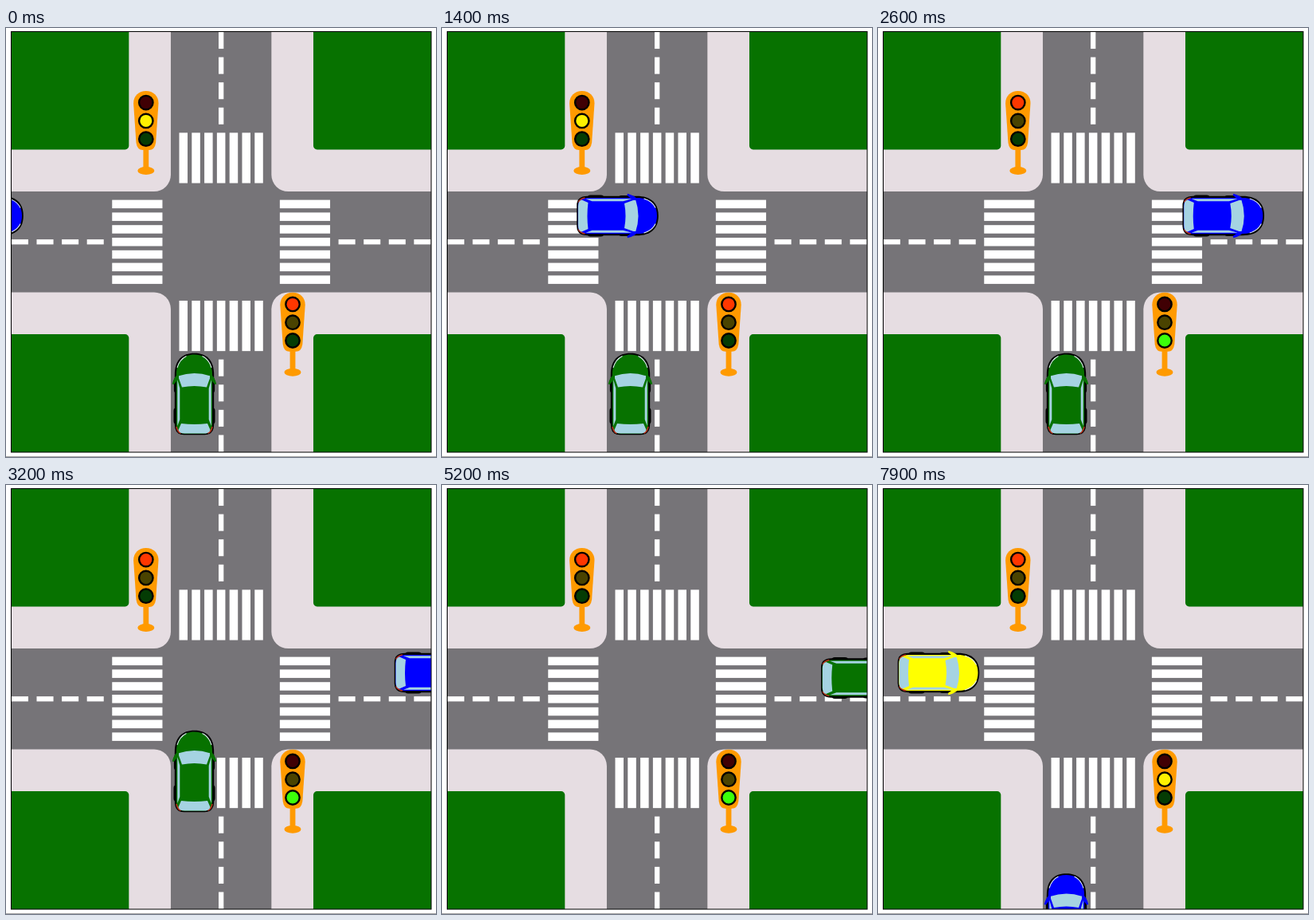
These frames come from a looping animation (540x538 px, 8 s). An HTML page:

```html
<!DOCTYPE html>
<html lang="en">
<head>
<meta charset="utf-8">
<title>Crossroads</title>
<style>
  html, body { margin: 0; width: 100%; height: 100%; overflow: hidden; background: #fff; }
  svg { display: block; }
</style>
</head>
<body>
<svg width="540" height="538" viewBox="0 0 540 538">
  <defs>
    <clipPath id="town"><rect x="7" y="5" width="527" height="527"/></clipPath>
    <g id="car">
      <g fill="#000">
        <rect x="-26" y="17" width="52" height="21" rx="4"/>
        <rect x="-25.6" y="-21" width="51.2" height="20" rx="4"/>
        <path d="M-24.7 38V-24C-24.7 -43 -15 -51.3 0 -51.3S24.7 -43 24.7 -24V38Q24.7 51.3 13 51.3H-13Q-24.7 51.3 -24.7 38Z"/>
      </g>
      <path d="M-22.6 38V-24C-22.6 -41 -14 -49.5 0 -49.5S22.6 -41 22.6 -24V38Q22.6 49.8 12 49.8H-12Q-22.6 49.8 -22.6 38Z" fill="currentColor"/>
      <path d="M-21.5 -33Q-18.5 -43.5 -10 -47.6M21.5 -33Q18.5 -43.5 10 -47.6" fill="none" stroke="#dfeaf0" stroke-width="1.1"/>
      <path d="M-22.5 41Q-21.5 47 -17 49.3M22.5 41Q21.5 47 17 49.3" fill="none" stroke="#b8301c" stroke-width="1.6"/>
      <g fill="#a5d3e2">
        <path d="M-20.5 -22.5Q0 -29.5 20.5 -22.5L15.5 -8.5Q0 -11.5 -15.5 -8.5Z"/>
        <path d="M-16.5 37Q0 39 16.5 37L20 45Q19 49.5 12 49.5H-12Q-19 49.5 -20 45Z"/>
        <path d="M-21.2 -18L-18.2 -7V32L-21.2 40ZM21.2 -18L18.2 -7V32L21.2 40Z"/>
      </g>
      <path d="M-19.5 -26Q-25.5 -22 -27.8 -12.5L-25.6 -12L-19.5 -20ZM19.5 -26Q25.5 -22 27.8 -12.5L25.6 -12L19.5 -20Z" fill="currentColor"/>
    </g>
    <g id="post" fill="#ff9a00">
      <rect x="-3.4" y="55" width="6.8" height="44"/>
      <ellipse cy="99" rx="10.5" ry="4.9"/>
      <path d="M-15.7 14.5C-15.7 5 -9 -1 0 -1S15.7 5 15.7 14.5L12.3 64Q11 73 4 73H-4Q-11 73 -12.3 64Z"/>
    </g>
  </defs>
  <g clip-path="url(#town)">
    <rect width="540" height="538" fill="#767478"/>
    <g id="ground" transform="translate(6.9 5) scale(10.53)"></g>
    <g id="cars"></g>
    <g id="lights"></g>
  </g>
  <rect x="6.5" y="4.5" width="527.5" height="527.5" fill="none" stroke="#000"/>
  <rect y="537" width="540" height="1" fill="#a5a5a5"/>
</svg>
<script>
const LOOP = 8000, STEP = 100;
const SVG = 'http://www.w3.org/2000/svg';
const $ = id => document.getElementById(id);

function add(parent, tag, attrs) {
  const el = document.createElementNS(SVG, tag);
  for (const k in attrs) el.setAttribute(k, attrs[k]);
  return parent.appendChild(el);
}

const ground = $('ground');
const box = (x, y, width, height, fill, rx = 0) =>
  add(ground, 'rect', { x, y, width, height, fill, rx });

// Pavement and lawn overshoot the town so only the inner corners look rounded.
for (const [x, y] of [[-5, -5], [31, -5], [-5, 31], [31, 31]])
  box(x, y, 24, 24, '#e6dde2', 2);
for (const [x, y] of [[-5, -5], [36, -5], [-5, 36], [36, 36]])
  box(x, y, 19, 19, '#077200', 0.45);

for (let i = 0; i < 7; i++) {
  const p = 20 + i * 1.5;
  for (const q of [12, 32]) {
    box(q, p, 6, 1, '#fff');
    box(p, q, 1, 6, '#fff');
  }
}
for (let i = 0; i < 4; i++)
  for (const p of [i * 3, 39 + i * 3]) {
    box(p, 24.7, 2, 0.6, '#fff');
    box(24.7, p, 0.6, 2, '#fff');
  }

const DARK = ['#400004', '#4a4300', '#043c04'];
const LIT = ['#ff3700', '#fff100', '#3cff0a'];

function makeLight(x, y, states) {
  const g = add($('lights'), 'g', { transform: `translate(${x} ${y})` });
  add(g, 'use', { href: '#post' });
  const lamps = DARK.map((fill, i) => add(g, 'circle',
    { cy: 13.6 + i * 22.8, r: 8.7, fill, stroke: '#000', 'stroke-width': 2.4 }));
  return t => {
    const on = states.filter(s => s[0] <= t).pop()[1];
    lamps.forEach((c, i) => c.setAttribute('fill', (i === on ? LIT : DARK)[i]));
  };
}

// Linear interpolation over [time, value] pairs, held at both ends.
function at(keys, t) {
  if (t <= keys[0][0]) return keys[0][1];
  for (let i = 1; i < keys.length; i++) {
    const [t0, v0] = keys[i - 1], [t1, v1] = keys[i];
    if (t <= t1) return v0 + (v1 - v0) * (t - t0) / (t1 - t0);
  }
  return keys[keys.length - 1][1];
}

function makeCar(color, keys, pose) {
  const el = add($('cars'), 'use', { href: '#car', color });
  return t => {
    const [x, y, deg] = pose(at(keys, t));
    el.setAttribute('transform', `translate(${x} ${y}) rotate(${deg})`);
  };
}

const eastward = x => [x, 235.5, 90];
const northward = y => [236.5, y, 0];

// Up the road, round a quarter circle, then off to the right.
function rightTurn(d) {
  const x0 = 236.5, r = 109, lead = 108, arc = r * Math.PI / 2;
  if (d < lead) return [x0, 459 - d, 0];
  if (d > lead + arc) return [x0 + r + d - lead - arc, 242, 90];
  const a = (d - lead) / r;
  return [x0 + r * (1 - Math.cos(a)), 351 - r * Math.sin(a), a * 180 / Math.PI];
}

const parts = [
  makeCar('#0000ff', [[0, -29.5], [800, 112.5], [2000, 328.5], [3200, 539], [3700, 628]], eastward),
  makeCar('#077200', [[2600, 0], [3200, 100], [4000, 241.5], [5200, 461], [5800, 568]], rightTurn),
  makeCar('#ffff00', [[5200, -66.5], [6000, 76]], eastward),
  makeCar('#0000ff', [[7400, 627.5], [8000, 520.7]], northward),
  makeLight(175.8, 80, [[0, 1], [2500, 0]]),
  makeLight(360, 332.8, [[0, 0], [2500, 2], [7500, 1]])
];

function draw(now) {
  const t = Math.floor(now % LOOP / STEP) * STEP;
  parts.forEach(set => set(t));
}

let start;
function tick(now) {
  start ??= now;
  draw(now - start);
  requestAnimationFrame(tick);
}
draw(0);
requestAnimationFrame(tick);
</script>
</body>
</html>
```
